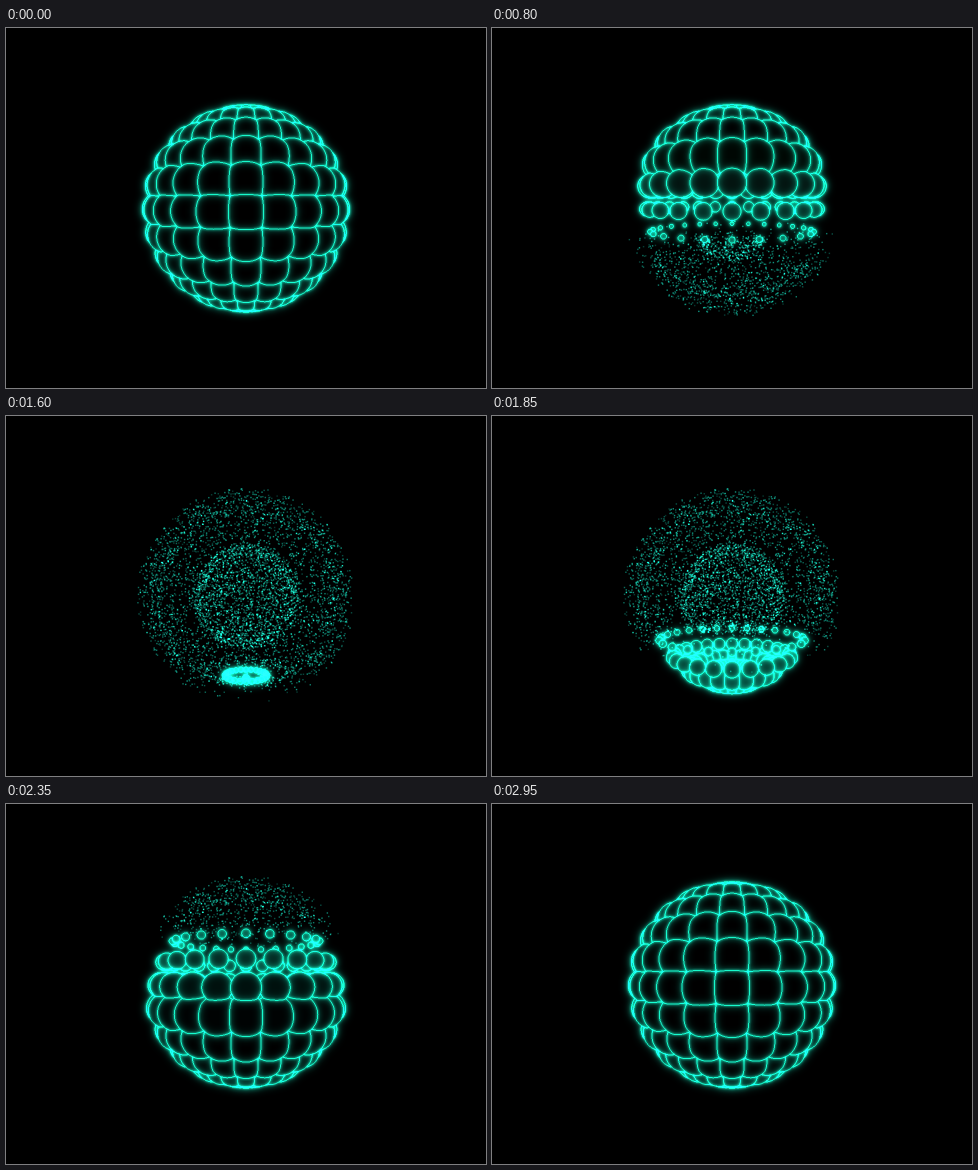
Animation, 480 px wide and 360 px high, one loop 3000 ms. Source, as an HTML page with a canvas:

```html
<!DOCTYPE html>
<html>
<head>
<meta charset="utf-8">
<style>
  html, body { margin: 0; width: 100%; height: 100%; overflow: hidden; background: #000; }
  canvas { display: block; }
</style>
</head>
<body>
<canvas id="stage" width="480" height="360"></canvas>
<script>
const ctx = document.getElementById('stage').getContext('2d');
const SIZE = 240, SCALE = 2, N = SIZE * SCALE;   // supersampled square around the globe
const CX = 240, CY = 180.5;
const R = 82, BALL = R / 5, EYE = 305, TILT = 0.027;
const STEP = Math.PI / 12;
const DISSOLVE = 0.13;                           // size share at which a ball turns to dust
const TEAL = 0xb8e114;                           // BGR

const layer = document.createElement('canvas');
layer.width = layer.height = N;
const layerCtx = layer.getContext('2d');
const image = layerCtx.createImageData(N, N);
const pixels = new Uint32Array(image.data.buffer);
const ids = new Uint16Array(N * N);
const depth = new Float32Array(N * N);

let seed = 7;
const rand = () => {
  seed = (seed * 16807) % 2147483647;
  return seed / 2147483647;
};
const clamp = v => Math.max(0, Math.min(1, v));
const teal = alpha => (Math.round(alpha * 255) << 24 | TEAL) >>> 0;

// Camera-space point on a sphere; y points down, z towards the eye.
function place(lat, lon, radius) {
  const h = radius * Math.sin(lat), ring = radius * Math.cos(lat);
  const z = ring * Math.cos(lon);
  return {
    x: ring * Math.sin(lon),
    y: -h * Math.cos(TILT) + z * Math.sin(TILT),
    z: z * Math.cos(TILT) + h * Math.sin(TILT),
    h, ring
  };
}

const balls = [];
for (let row = -6; row <= 6; row++) {
  const count = Math.abs(row) === 6 ? 1 : 24;
  for (let col = 0; col < count; col++) balls.push(place(row * STEP, col * STEP, R));
}

// Each speck flies from a nearby lattice node to a random spot around the shell.
function speck(base, min, max) {
  const lat = Math.asin(rand() * 2 - 1), lon = rand() * Math.PI * 2;
  const snap = a => Math.round((a + (rand() - 0.5) * 0.4) / STEP) * STEP;
  return {
    from: place(snap(lat), snap(lon), base),
    to: place(lat, lon, min + (max - min) * rand()),
    alpha: 0.3 + 0.6 * rand()
  };
}
const specks = [];
for (let i = 0; i < 4000; i++) specks.push(speck(R, 84, 103));
for (let i = 0; i < 1600; i++) specks.push(speck(R / 2, 45, 54));

// Positive: share of full size; negative: dissolved.
const growth = (h, t) => Math.max(h / R - 2 * (t - 1), 2 * (t - 2) - h / R);

function traceBall(ball, r, id) {
  const cz = ball.z - EYE, s = EYE / -cz;
  const reach = r * s * 1.12 + 1;
  const len = ball.x * ball.x + ball.y * ball.y + cz * cz - r * r;
  const bound = v => Math.round((v + SIZE / 2) * SCALE);
  const x0 = bound(ball.x * s - reach), x1 = bound(ball.x * s + reach);
  const y0 = bound(ball.y * s - reach), y1 = bound(ball.y * s + reach);
  for (let j = y0; j <= y1; j++) {
    const py = (j + 0.5) / SCALE - SIZE / 2;
    for (let i = x0; i <= x1; i++) {
      const px = (i + 0.5) / SCALE - SIZE / 2;
      const a = px * px + py * py + EYE * EYE;
      const b = ball.x * px + ball.y * py - cz * EYE;
      const d = b * b - a * len;
      if (d < 0) continue;
      const k = (b - Math.sqrt(d)) / a, p = j * N + i;
      if (k < depth[p]) {
        depth[p] = k;
        ids[p] = id;
      }
    }
  }
}

// Outlines where neighbouring balls meet; shrunken, crowded balls glow inside.
function paintLayer(t) {
  const line = teal(1), fills = [0];
  for (const { h, ring } of balls) {
    const crowd = R / Math.max(ring, 12);
    fills.push(teal(0.08 * crowd * (1 - clamp(growth(h, t)))));
  }
  for (let p = 0; p < N * N; p++) pixels[p] = fills[ids[p]];
  for (let p = 0; p < N * (N - 1); p++) {
    if (ids[p] !== ids[p + 1]) pixels[p] = pixels[p + 1] = line;
    if (ids[p] !== ids[p + N]) pixels[p] = pixels[p + N] = line;
  }
  layerCtx.putImageData(image, 0, 0);
}

function drawSpecks(t) {
  ctx.fillStyle = '#10a890';
  for (const { from, to, alpha } of specks) {
    const g = growth(from.h, t);
    if (g > DISSOLVE) continue;
    const m = clamp(1 - g / DISSOLVE) ** 1.5;
    const mix = key => from[key] + (to[key] - from[key]) * m;
    const k = (EYE - mix('z')) / EYE;
    const x = mix('x') / k, y = mix('y') / k;
    const p = Math.floor((y + SIZE / 2) * SCALE) * N + Math.floor((x + SIZE / 2) * SCALE);
    if (depth[p] < k) continue;
    ctx.globalAlpha = alpha;
    ctx.fillRect(CX + x - 0.7, CY + y - 0.7, 1.4, 1.4);
  }
}

function drawLayer(blur, alpha) {
  ctx.filter = blur ? `blur(${blur}px)` : 'none';
  ctx.globalAlpha = alpha;
  ctx.drawImage(layer, CX - SIZE / 2, CY - SIZE / 2, SIZE, SIZE);
}

function render(t) {
  ids.fill(0);
  depth.fill(9);
  balls.forEach((ball, i) => {
    const g = clamp(growth(ball.h, t));
    if (g > DISSOLVE) traceBall(ball, BALL * g, i + 1);
  });
  paintLayer(t);

  ctx.globalCompositeOperation = 'source-over';
  ctx.filter = 'none';
  ctx.globalAlpha = 1;
  ctx.fillStyle = '#000';
  ctx.fillRect(0, 0, 480, 360);
  ctx.globalCompositeOperation = 'lighter';
  drawSpecks(t);
  drawLayer(4.5, 1);
  drawLayer(2.5, 0.9);
  drawLayer(0.9, 1);
  drawLayer(0, 0.55);
  ctx.filter = 'none';
}

const start = performance.now();
let shown = -1;
function tick() {
  const step = Math.floor((performance.now() - start) / 50) % 60;
  if (step !== shown) render((shown = step) / 20);
  requestAnimationFrame(tick);
}
tick();
</script>
</body>
</html>
```
